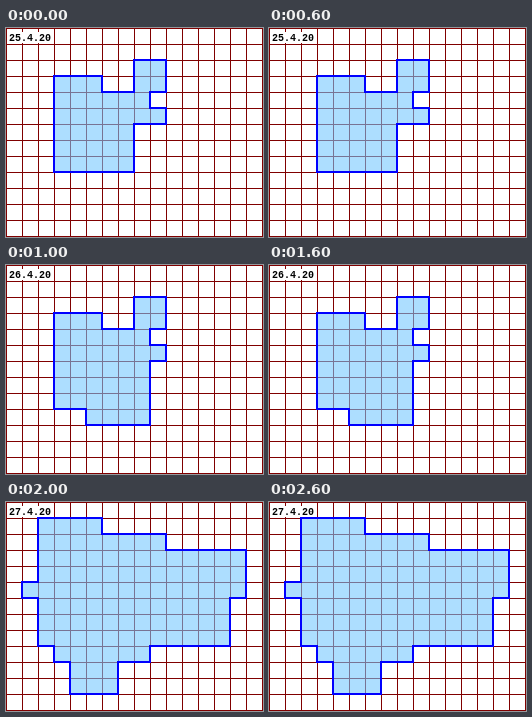
Recreate the animation shown at these times as an HTML page. Size 257 by 209 pixels, loop 3000 ms.

```html
<!DOCTYPE html>
<html lang="en">
<head>
<meta charset="utf-8">
<style>
  html, body { margin: 0; width: 100%; height: 100%; overflow: hidden; background: #fff; }
  svg { display: block; shape-rendering: crispEdges; }
  #area { fill: rgba(115, 198, 255, .58); stroke: #00f; stroke-width: .125; }
  text { font: bold 10px "Liberation Mono", "Courier New", monospace; }
</style>
</head>
<body>
<svg width="257" height="209">
  <defs>
    <pattern id="grid" width="16" height="16" patternUnits="userSpaceOnUse">
      <path d="M0 0H16V1H1V16H0Z" fill="#800000"/>
    </pattern>
  </defs>
  <rect width="257" height="209" fill="url(#grid)"/>
  <path id="area" transform="scale(16)"/>
  <rect x="2" y="4" width="45" height="11" fill="#fff"/>
  <text id="date" x="3" y="13"></text>
</svg>
<script>
  // One outline per day, in grid cells
  const days = [
    ['25.4.20', 'M3 3H6V4H8V2H10V4H9V5H10V6H8V9H3Z'],
    ['26.4.20', 'M3 3H6V4H8V2H10V4H9V5H10V6H9V10H5V9H3Z'],
    ['27.4.20', 'M2 1H6V2H10V3H15V6H14V9H9V10H7V12H4V10H3V9H2V6H1V5H2Z'],
  ];
  const area = document.getElementById('area');
  const date = document.getElementById('date');

  function draw(time) {
    const [label, outline] = days[Math.floor(time / 1000) % days.length];
    date.textContent = label;
    area.setAttribute('d', outline);
  }

  function tick() {
    draw(performance.now());
    requestAnimationFrame(tick);
  }
  tick();
</script>
</body>
</html>
```
